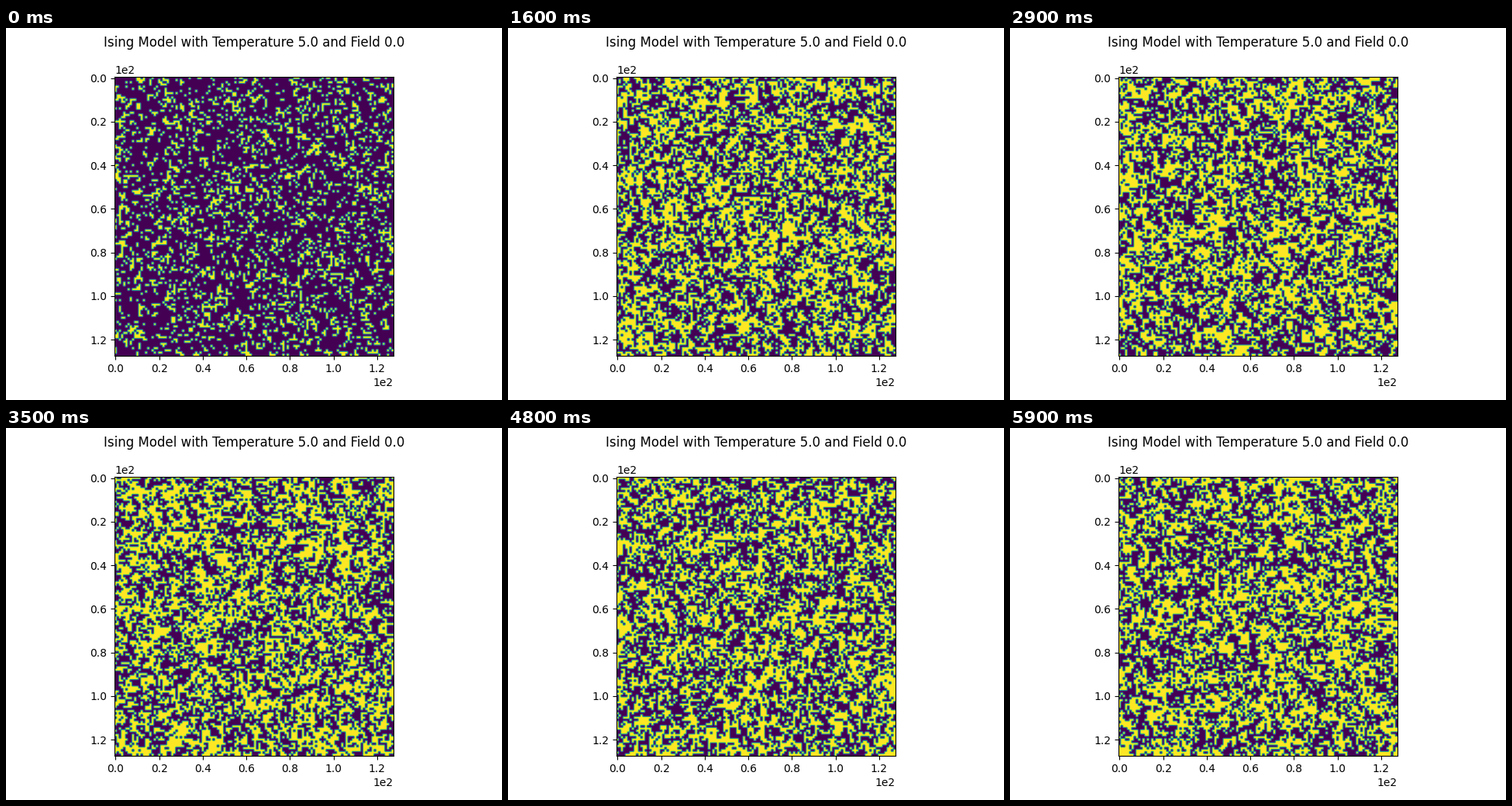
These frames come from a looping animation (640x480 px, 6000 ms). A matplotlib script:

```python
import numpy as np
import matplotlib.pyplot as plt
from matplotlib.animation import FuncAnimation

WIDTH, HEIGHT, DPI = 640, 480, 100
FRAMES, INTERVAL = 60, 100
SIZE = 128
TEMPERATURE, FIELD = 5.0, 0.0
BATCHES = 4

rng = np.random.default_rng(12)
rows, cols = np.indices((SIZE, SIZE))
parity = (rows + cols) % 2


def sweep(spins):
    """One heat-bath pass: every site once, in randomly mixed batches."""
    spins = spins.copy()
    batch = rng.integers(BATCHES, size=spins.shape)
    for step in range(2 * BATCHES):
        neighbours = sum(np.roll(spins, shift, axis)
                         for shift in (-1, 1) for axis in (0, 1))
        p_up = 1 / (1 + np.exp(-2 * (neighbours + FIELD) / TEMPERATURE))
        drawn = np.where(rng.random(spins.shape) < p_up, 1, -1)
        chosen = (batch == step // 2) & (parity == step % 2)
        spins[chosen] = drawn[chosen]
    return spins


def simulate():
    spins = np.full((SIZE, SIZE), -1)
    states = []
    for _ in range(FRAMES):
        spins = sweep(spins)
        states.append(spins)
    return states


states = simulate()

fig = plt.figure(figsize=(WIDTH / DPI, HEIGHT / DPI), dpi=DPI)
fig.suptitle(f"Ising Model with Temperature {TEMPERATURE} and Field {FIELD}")
ax = fig.add_axes([140 / WIDTH, 56.8 / HEIGHT, 360 / WIDTH, 360 / HEIGHT])
image = ax.imshow(states[0], cmap="viridis", vmin=-1, vmax=1)
ax.set_xticks(range(0, SIZE, 20))
ax.set_yticks(range(0, SIZE, 20))
ax.ticklabel_format(style="sci", scilimits=(0, 0))


def draw(frame):
    image.set_data(states[frame])
    return [image]


anim = FuncAnimation(fig, draw, frames=FRAMES, interval=INTERVAL,
                     repeat=True, repeat_delay=0)
plt.show()
```
